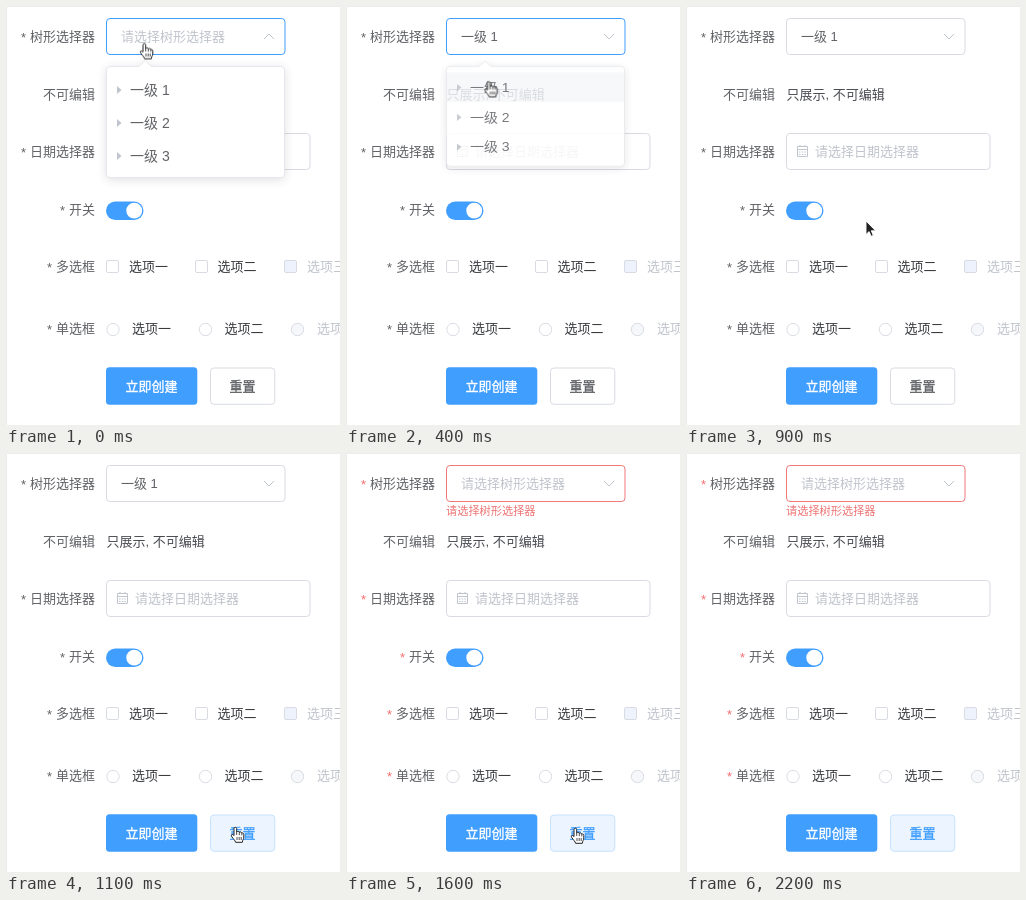
Write an HTML page that moves like this. It is 334x419 px and loops after 2300 ms.

```html
<!DOCTYPE html>
<html lang="zh-CN">
<head>
<meta charset="utf-8">
<title>表单</title>
<style>
html, body { margin: 0; width: 100%; height: 100%; overflow: hidden; background: #fff; }
svg { display: block; width: 334px; height: 419px; }
text { font: 13px "Liberation Sans", "Noto Sans CJK SC", "Noto Sans CJK", sans-serif; fill: #606266; white-space: pre; }
.label text { text-anchor: end; }
.label .star { text-anchor: start; animation-name: star; }
.dark text { fill: #3a3c40; }
.plain { fill: #484a50; }
text.hint, .off text { fill: #c0c4cc; }
.box { fill: #fff; stroke: #d8dbe2; }
.off .box { fill: #edf2fc; }
.off circle.box { fill: #f5f7fa; }
.line { fill: none; stroke: #c0c4cc; }
.menu text { font-size: 14px; }
.menu .panel { fill: #fff; stroke: #e4e7ed; filter: drop-shadow(0 2px 5px rgba(0, 0, 0, .12)); }
.menu .tri { fill: #c0c4cc; }
.button text { text-anchor: middle; stroke-width: .35; }
.pen { fill: none; stroke: #222; }

/* One step is 100 ms, 23 steps to a loop */
.anim { animation-duration: 2300ms; animation-timing-function: step-end; animation-iteration-count: infinite; }
.field { animation-name: field; }
.empty { animation-name: empty; }
.value { animation-name: value; }
.up { animation-name: up; }
.down { animation-name: down; }
.error { animation-name: error; }
.menu { animation-name: menu; transform-origin: 139px 60px; }
.row { animation-name: row; }
.reset { animation-name: reset; }
.resetText { animation-name: resetText; }
.cursor { animation-name: move; }
.hand { animation-name: hand; }
.beam { animation-name: beam; }
.arrow { animation-name: arrow; }
.ring { animation-name: ring; }

@keyframes star { 0% { fill: #606266; } 65.2%, 100% { fill: #f56c6c; } }
@keyframes field { 0% { stroke: #409eff; } 26.08% { stroke: #d8dbe2; } 65.2% { stroke: #f09a9c; } 69.56%, 100% { stroke: #f07878; } }
@keyframes empty { 0% { opacity: 1; } 17.39% { opacity: 0; } 65.2%, 100% { opacity: 1; } }
@keyframes value { 0% { opacity: 0; } 17.39% { opacity: 1; } 65.2%, 100% { opacity: 0; } }
@keyframes up { 0% { opacity: 1; } 17.39%, 100% { opacity: 0; } }
@keyframes down { 0% { opacity: 0; } 17.39%, 100% { opacity: 1; } }
@keyframes error { 0% { opacity: 0; } 65.2% { opacity: .6; } 69.56%, 100% { opacity: 1; } }
@keyframes menu {
  0% { opacity: 1; transform: none; }
  17.39% { opacity: .85; transform: scaleY(.9); }
  21.73% { opacity: .3; transform: scaleY(.4); }
  26.08%, 100% { opacity: 0; transform: none; }
}
@keyframes row { 0% { opacity: 0; } 8.69%, 100% { opacity: 1; } }
@keyframes reset {
  0% { fill: #fff; stroke: #d8dbe2; }
  47.82% { fill: #ecf5ff; stroke: #c6e2ff; }
  60.86% { fill: #ecf5ff; stroke: #3a8ee6; }
  65.2%, 100% { fill: #ecf5ff; stroke: #c6e2ff; }
}
@keyframes resetText { 0% { fill: #606266; stroke: #606266; } 47.82%, 100% { fill: #409eff; stroke: #409eff; } }
@keyframes move {
  0% { transform: translate(138px, 37.5px); }
  4.34% { transform: translate(139.5px, 56px); }
  8.69% { transform: translate(142px, 74px); }
  13.04% { transform: translate(142.5px, 75.5px); }
  26.08% { transform: translate(142.5px, 79.5px); }
  34.78% { transform: translate(152px, 112px); }
  39.13% { transform: translate(180px, 215px); }
  43.47% { transform: translate(216px, 335px); }
  47.82% { transform: translate(229px, 374px); }
  60.86%, 100% { transform: translate(229px, 375px); }
}
@keyframes hand { 0% { opacity: 1; } 26.08% { opacity: 0; } 47.82% { opacity: 1; } 91.3%, 100% { opacity: 0; } }
@keyframes beam { 0% { opacity: 0; } 26.08% { opacity: 1; } 34.78%, 100% { opacity: 0; } }
@keyframes arrow { 0% { opacity: 0; } 34.78% { opacity: 1; } 47.82%, 100% { opacity: 0; } }
@keyframes ring { 0% { opacity: 0; } 13.04% { opacity: 1; } 17.39% { opacity: 0; } 60.86% { opacity: 1; } 65.2%, 100% { opacity: 0; } }
</style>
</head>
<body>
<svg viewBox="0 0 334 419">
  <path d="M.5 419V.5H334" fill="none" stroke="#ececec"/>

  <g class="label">
    <text class="star anim" x="15" y="36">*</text><text x="89" y="35">树形选择器</text>
    <text x="89" y="93">不可编辑</text>
    <text class="star anim" x="15" y="151">*</text><text x="89" y="150">日期选择器</text>
    <text class="star anim" x="54" y="209">*</text><text x="89" y="208">开关</text>
    <text class="star anim" x="41" y="266">*</text><text x="89" y="265">多选框</text>
    <text class="star anim" x="41" y="328">*</text><text x="89" y="327">单选框</text>
  </g>

  <!-- Tree select -->
  <rect class="box field anim" x="100.5" y="12.5" width="178.500" height="36" rx="3.5"/>
  <text class="hint empty anim" x="115" y="35">请选择树形选择器</text>
  <text class="value anim" x="115" y="35">一级 1</text>
  <path class="line up anim" d="M258 33l5-5 5 5"/>
  <path class="line down anim" d="M258 28l5 5 5-5"/>
  <text class="error anim" x="100" y="62" style="font-size:11.2px;fill:#ee7474">请选择树形选择器</text>

  <text class="plain" x="100.5" y="93">只展示, 不可编辑</text>

  <!-- Date -->
  <rect class="box" x="100.5" y="127.5" width="203.500" height="36" rx="3.5"/>
  <path class="line" d="M111.500 140.500h10v10h-10zM111.500 143.500h10M114 139v2M119 139v2"/>
  <path class="line" d="M113 146h7M113 148.500h7" stroke-dasharray="1.5 1.2"/>
  <text class="hint" x="129" y="150">请选择日期选择器</text>

  <!-- Switch -->
  <rect x="100" y="195.5" width="37.5" height="18.5" rx="9.25" fill="#409eff"/>
  <circle cx="128.2" cy="204.7" r="7.9" fill="#fff"/>

  <g class="dark">
    <rect class="box" x="100.5" y="254.5" width="12" height="12" rx="1.5"/><text x="123" y="265">选项一</text>
    <rect class="box" x="189.5" y="254.5" width="12" height="12" rx="1.5"/><text x="211.5" y="265">选项二</text>
    <circle class="box" cx="107" cy="323.5" r="6.2"/><text x="126" y="327">选项一</text>
    <circle class="box" cx="199.5" cy="323.5" r="6.2"/><text x="218.5" y="327">选项二</text>
  </g>
  <g class="off">
    <rect class="box" x="278.5" y="254.5" width="12" height="12" rx="1.5"/><text x="301" y="265">选项三</text>
    <circle class="box" cx="291.5" cy="323.5" r="6.2"/><text x="311" y="327">选项三</text>
  </g>

  <g class="button">
    <rect x="100" y="361.300" width="91.300" height="37.500" rx="3.5" fill="#409eff"/>
    <text x="145.5" y="385" style="fill:#fff;stroke:#fff">立即创建</text>
    <rect class="box reset anim" x="204.5" y="362" width="64.300" height="36.300" rx="3.5"/>
    <text class="resetText anim" x="236.5" y="385">重置</text>
  </g>

  <!-- Dropdown -->
  <g class="menu anim">
    <path class="panel" d="M104 60.5h29l6-6 6 6h130q3.500 0 3.500 3.500v104q0 3.500-3.500 3.500h-171q-3.500 0-3.500-3.500v-104q0-3.500 3.500-3.500z"/>
    <rect class="row anim" x="101" y="67" width="177" height="33" fill="#f5f7fa"/>
    <path class="tri" d="M111 80l4.500 4-4.500 4zM111 113l4.500 4-4.500 4zM111 146l4.500 4-4.500 4z"/>
    <text x="124" y="89">一级 1</text>
    <text x="124" y="122">一级 2</text>
    <text x="124" y="155">一级 3</text>
  </g>

  <g class="cursor anim">
    <circle class="pen ring anim" r="28.3" stroke-width="1.3"/>
    <g class="hand anim">
      <path d="M-1 8V1.500C-1-.2 1.700-.2 1.700 1.500V5C2.200 4 4.200 4.200 4.300 5.400 4.900 4.600 6.700 5 6.800 6.200 7.500 5.600 8.800 6.100 8.800 7.300V10C8.800 12 7.500 13 7.300 15.300H.6C.4 13.600-1.700 12-3.500 9.200-4.300 7.600-2.600 6.600-1 8.600z" fill="#fff" stroke="#222"/>
      <path class="pen" d="M1.700 5v3M4.300 5.400v2.800M6.800 6.200v2.200M2 10v3M4.200 10v3M6.200 10v3" stroke-width=".8"/>
    </g>
    <path class="pen beam anim" d="M-3-7Q0-7 0-5 0-7 3-7M0-5V6M-3 8Q0 8 0 6 0 8 3 8M-1.500 3h3" stroke-width=".9"/>
    <path class="arrow anim" d="M0 0V13.500L3.100 10.600 5.200 15.300 7.300 14.400 5.300 9.800H9.600z" fill="#222" stroke="#fff" stroke-width=".9"/>
  </g>
</svg>
</body>
</html>
```
